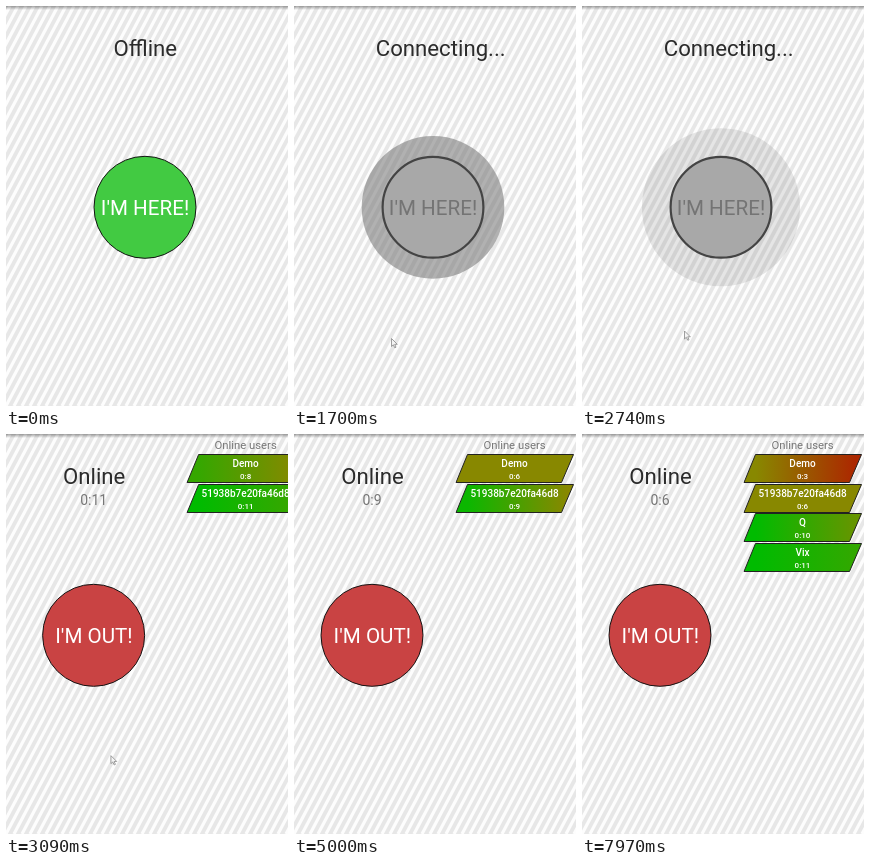
Animation, 282 px wide and 400 px high, one loop 8000 ms. Source, as an HTML page with a canvas:

```html
<!DOCTYPE html>
<html lang="en">
<head>
<meta charset="utf-8">
<title>Presence button</title>
<style>
  html, body { margin: 0; width: 100%; height: 100%; overflow: hidden; background: #eee; }
  canvas { display: block; }
</style>
</head>
<body>
<canvas id="stage" width="282" height="400"></canvas>
<script>
const LOOP = 8000;
const SECOND = 985;
const CONNECT = 1100, ONLINE = 2850;
const PULSE_PERIOD = 465, PULSE_TIME = 300;
const TITLE_SIZE = 22.2, BUTTON_SIZE = 20.6;
const GREEN = [0, 187, 0], OLIVE = [136, 136, 0], RED = [187, 0, 0];
const ctx = document.getElementById('stage').getContext('2d');

// Each user has "left" seconds remaining at time "at".
const users = [
  { name: 'Demo', shown: ONLINE, at: 5870, left: 6 },
  { name: '51938b7e20fa46d8', shown: ONLINE, at: 3785, left: 11 },
  { name: 'Q', shown: 5600, at: 7970, left: 10.75 },
  { name: 'Vix', shown: 7000, at: 7970, left: 11.9 }
];

const pointerPath = [
  [1140, 88, 348], [1220, 91, 321], [1400, 97, 332],
  [2540, 97, 332], [2740, 102, 324.5], [3320, 106, 319], [3800, 106, 319]
];

const clamp = v => Math.max(0, Math.min(1, v));
const mix = (a, b, k) => a + (b - a) * k;
const progress = (t, start, length) => clamp((t - start) / length);
const easeOut = k => 1 - (1 - k) ** 2;
const mixColor = (a, b, k) => `rgb(${a.map((v, i) => Math.round(mix(v, b[i], k)))})`;
const secondsLeft = (user, t) => user.left + (user.at - t) / SECOND;
const clock = seconds => '0:' + Math.min(12, Math.floor(seconds));

function text(label, x, y, size, color, weight = 400) {
  ctx.font = `${weight} ${size}px Roboto, sans-serif`;
  ctx.textAlign = 'center';
  ctx.fillStyle = color;
  ctx.fillText(label, x, y);
}

function disc(x, radius, fill, stroke, lineWidth) {
  ctx.beginPath();
  ctx.arc(x, 201.3, radius, 0, Math.PI * 2);
  ctx.fillStyle = fill;
  ctx.fill();
  if (!stroke) return;
  ctx.strokeStyle = stroke;
  ctx.lineWidth = lineWidth;
  ctx.stroke();
}

function background() {
  ctx.fillStyle = '#e7e7e7';
  ctx.fillRect(0, 0, 282, 400);
  ctx.beginPath();
  for (let x = -240; x < 300; x += 8) {
    ctx.moveTo(x, 400);
    ctx.lineTo(x + 212, 0);
  }
  ctx.strokeStyle = '#fdfdfd';
  ctx.lineWidth = 3.2;
  ctx.stroke();
  const shade = ctx.createLinearGradient(0, 0, 0, 4);
  shade.addColorStop(0, 'rgba(0,0,0,.35)');
  shade.addColorStop(1, 'rgba(0,0,0,0)');
  ctx.fillStyle = shade;
  ctx.fillRect(0, 0, 282, 4);
}

function offline(t) {
  const k = progress(t, 300, 780);
  ctx.save();
  ctx.globalAlpha = 1 - k;
  ctx.translate(139.3, 41.5);
  ctx.scale(1 + 0.7 * k, 1 + 0.7 * k);
  text('Offline', 0, 8, TITLE_SIZE, '#2b2b2b');
  ctx.restore();
  hereButton(k);
}

function hereButton(k) {
  disc(139, mix(51, 50.4, k), mixColor([66, 202, 66], [168, 168, 168], k),
    mixColor([20, 20, 20], [68, 68, 68], k), mix(1, 2.2, k));
  text("I'M HERE!", 139, 209, BUTTON_SIZE, mixColor([255, 255, 255], [116, 116, 116], k));
}

function connecting(t) {
  text('Connecting...', 146.7, 49.5, TITLE_SIZE, '#2b2b2b');
  const k = ((t - CONNECT) % PULSE_PERIOD) / PULSE_TIME;
  if (k < 1) disc(139, mix(51, 80, easeOut(k)), `rgba(115,115,115,${1 - k})`);
  hereButton(1);
}

// The right end of a bar changes colour first, then the left end follows.
function barColor(seconds, isLeft) {
  const lag = isLeft ? 3 : 0;
  return seconds > 6
    ? mixColor(GREEN, OLIVE, clamp((13 - lag - seconds) / 3))
    : mixColor(OLIVE, RED, clamp((6 - lag - seconds) / 3));
}

function userBar(user, row, t) {
  if (t < user.shown) return;
  const seconds = secondsLeft(user, t);
  const y = 20.5 + Math.round(row * 29.6);
  const fill = ctx.createLinearGradient(162, 0, 279, 0);
  fill.addColorStop(0.1, barColor(seconds, true));
  fill.addColorStop(0.95, barColor(seconds, false));
  ctx.globalAlpha = row < 2 ? 1 : progress(t, user.shown, 200);
  ctx.beginPath();
  ctx.moveTo(173.5, y);
  ctx.lineTo(279.5, y);
  ctx.lineTo(267.5, y + 28);
  ctx.lineTo(162, y + 28);
  ctx.closePath();
  ctx.fillStyle = fill;
  ctx.fill();
  ctx.strokeStyle = '#222';
  ctx.lineWidth = 1;
  ctx.stroke();
  text(user.name, 220.5, y + 12.5, 10, '#fff', 500);
  text(clock(seconds), 220.5, y + 24, 8, '#fff', 500);
  ctx.globalAlpha = 1;
}

function online(t) {
  const k = easeOut(progress(t, ONLINE, 400));
  const x = mix(139, 78, k);
  text('Online', x + 0.5, 49.5, TITLE_SIZE, '#2b2b2b');
  text(clock(secondsLeft(users[1], t)), x, 71, 14, '#777');
  disc(x, 51, '#c94343', '#141414', 1);
  text("I'M OUT!", x + 0.3, 209, BUTTON_SIZE, '#fff');
  ctx.save();
  ctx.translate(121 * (1 - k), 0);
  text('Online users', 220.5, 15, 11.3, '#777');
  users.forEach((user, row) => userBar(user, row, t));
  ctx.restore();
}

function pointer(t) {
  const next = pointerPath.findIndex(point => point[0] > t);
  if (next < 1) return;
  const [t0, x0, y0] = pointerPath[next - 1];
  const [t1, x1, y1] = pointerPath[next];
  const k = (t - t0) / (t1 - t0);
  ctx.save();
  ctx.translate(mix(x0, x1, k), mix(y0, y1, k));
  ctx.beginPath();
  [[0.5, 0.5], [0.5, 8.5], [2.3, 6.8], [3.8, 9.8], [5, 9.2], [3.7, 6.3], [6.3, 6.3]]
    .forEach(([x, y]) => ctx.lineTo(x, y));
  ctx.closePath();
  ctx.fillStyle = '#f4f4f4';
  ctx.fill();
  ctx.strokeStyle = '#888';
  ctx.lineWidth = 0.8;
  ctx.stroke();
  ctx.restore();
}

function draw(now) {
  const t = now % LOOP;
  background();
  if (t < CONNECT) offline(t);
  else if (t < ONLINE) connecting(t);
  else online(t);
  pointer(t);
}

const start = performance.now();
function tick() {
  draw(performance.now() - start);
  requestAnimationFrame(tick);
}
tick();
</script>
</body>
</html>
```
